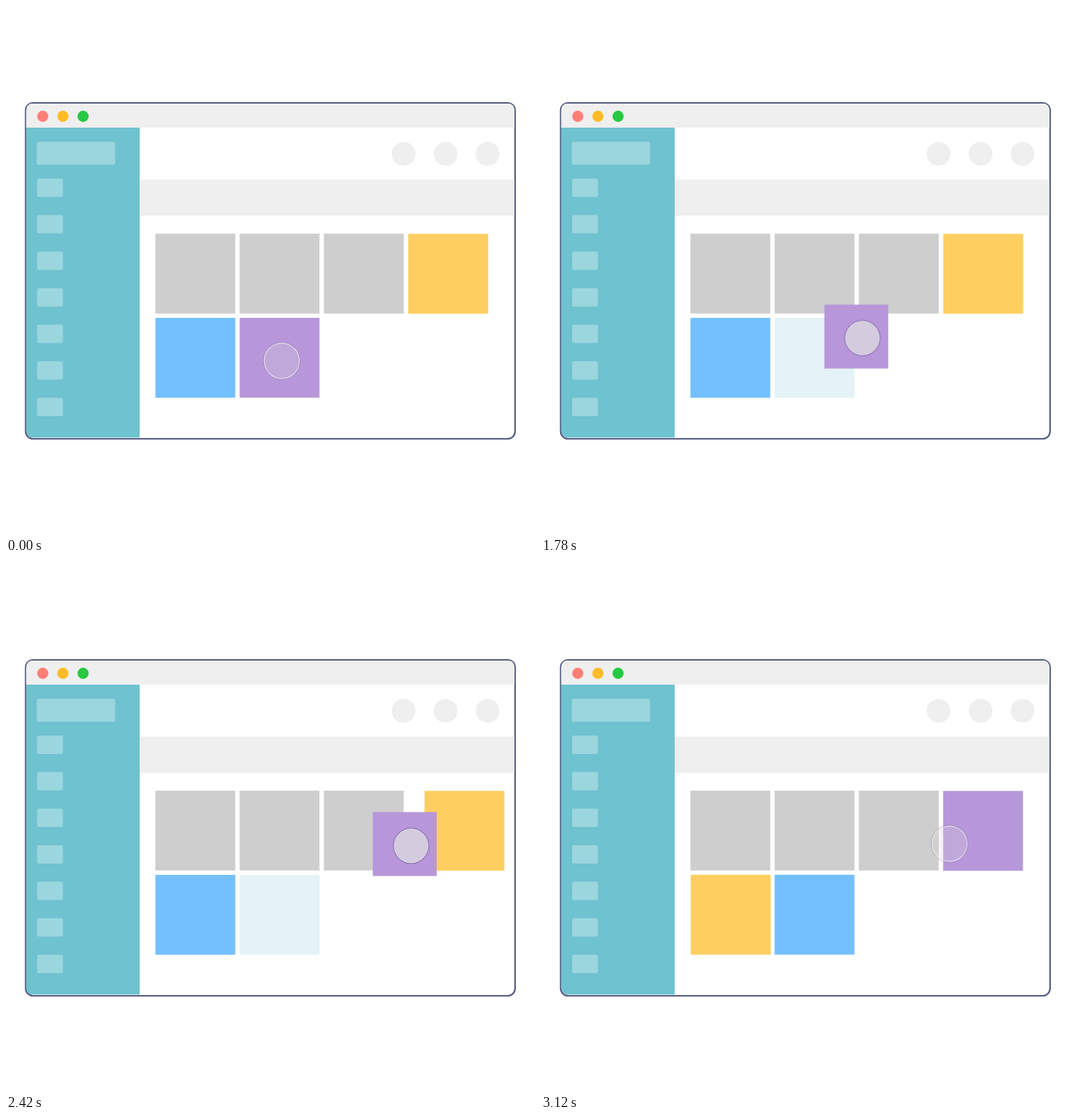
Animation of 748 by 748 pixels, one loop 4.56 s. Source, as an HTML page:

```html
<!DOCTYPE html>
<html lang="en">
<head>
<meta charset="utf-8">
<title>Drag to reorder</title>
<style>
  html, body { margin: 0; width: 100%; height: 100%; overflow: hidden; background: #fff; }
  svg { display: block; width: 100%; height: 100%; }

  .soft { fill: #efefef; }
  .item { fill: #9bd5de; }
  .grey { fill: #cecece; }
  .slot { fill: #e4f3f5; }
  .blue { fill: #74c0ff; }
  .yellow { fill: #ffce60; }
  .purple { fill: #b797da; }

  .slot, .blue, .yellow, .purple, .cursor, .idle, .pressed {
    animation: 4560ms ease infinite;
  }
  .slot { animation-name: slot; animation-timing-function: step-end; }
  .blue { animation-name: blue; }
  .yellow { animation-name: yellow; }
  .purple { animation-name: purple; }
  .cursor { animation-name: cursor; }
  .idle { animation-name: idle; animation-timing-function: step-end; }
  .pressed { animation-name: pressed; animation-timing-function: step-end; }

  @keyframes slot {
    0%, 60.95%, 100% { opacity: 0; }
    31.15% { opacity: 1; }
  }
  @keyframes idle {
    0%, 60.95%, 100% { opacity: 1; }
    28.06% { opacity: 0; }
  }
  @keyframes pressed {
    0%, 60.95%, 100% { opacity: 0; }
    28.06% { opacity: 1; }
  }
  @keyframes blue {
    0%, 60.526% { transform: translate(211.3px, 441px); }
    68.421%, 100% { transform: translate(330.3px, 440.8px); }
  }
  @keyframes yellow {
    0%, 47.368% { transform: translate(568.8px, 322.2px); }
    55.263%, 60.526% { transform: translate(593px, 322.2px); }
    68.421%, 100% { transform: translate(211.8px, 440.8px); }
  }
  @keyframes purple {
    0%, 31.14% { transform: translate(330.4px, 440.9px) scale(1); }
    39.035%, 39.474% { transform: translate(400.7px, 422.3px) scale(.8); }
    47.368%, 47.807% { transform: translate(482px, 375.1px) scale(.8); }
    56.579%, 60.526% { transform: translate(523.3px, 349.3px) scale(.8); }
    68.421%, 100% { transform: translate(568.6px, 322.3px) scale(1); }
  }
  @keyframes cursor {
    0%, 31.14% { transform: translate(390px, 501.7px); }
    39.035%, 39.474% { transform: translate(454.5px, 469.5px); }
    47.368%, 47.807% { transform: translate(535px, 422.5px); }
    56.579%, 100% { transform: translate(577.6px, 397px); }
  }
</style>
</head>
<body>
<svg viewBox="0 0 748 748">
  <defs>
    <clipPath id="frame"><rect x="28.5" y="137.5" width="690.5" height="473" rx="9.5"/></clipPath>
    <rect id="tile" width="112.9" height="112.9"/>
    <rect id="entry" x="44" width="36.5" height="26" rx="2.5"/>
  </defs>

  <!-- window -->
  <rect x="27.8" y="137" width="692" height="475" rx="10.5" fill="#fff" stroke="#545a80" stroke-width="2.2"/>
  <g clip-path="url(#frame)">
    <rect class="soft" x="28" y="138" width="691" height="34"/>
    <rect x="28" y="172" width="161" height="438.5" fill="#6fc2cf"/>
    <rect class="soft" x="189" y="245.5" width="529.5" height="51"/>
  </g>
  <circle cx="52" cy="156" r="7.9" fill="#ff7f77"/>
  <circle cx="80.5" cy="156" r="7.9" fill="#ffbb27"/>
  <circle cx="109" cy="156" r="7.9" fill="#26c941"/>

  <!-- sidebar and toolbar -->
  <g class="item">
    <rect x="43.5" y="192" width="110.8" height="32.5" rx="2.5"/>
    <use href="#entry" y="244"/>
    <use href="#entry" y="295.6"/>
    <use href="#entry" y="347.3"/>
    <use href="#entry" y="399"/>
    <use href="#entry" y="450.6"/>
    <use href="#entry" y="502.3"/>
    <use href="#entry" y="554"/>
  </g>
  <g class="soft">
    <circle cx="562.2" cy="209" r="16.8"/>
    <circle cx="621.6" cy="209" r="16.8"/>
    <circle cx="681" cy="209" r="16.8"/>
  </g>

  <!-- tiles -->
  <g class="grey">
    <use href="#tile" x="211.3" y="321.9"/>
    <use href="#tile" x="330.4" y="321.9"/>
    <use href="#tile" x="449.5" y="321.9"/>
  </g>
  <use class="slot" href="#tile" x="330.4" y="441"/>
  <use class="blue" href="#tile"/>
  <use class="yellow" href="#tile"/>
  <use class="purple" href="#tile"/>

  <g class="cursor">
    <g class="idle">
      <circle r="25.9" fill="none" stroke="#3c3250" stroke-opacity=".45" stroke-width="1"/>
      <circle r="25.1" fill="#d6d4de" fill-opacity=".28" stroke="#fff" stroke-opacity=".8" stroke-width="1.1"/>
    </g>
    <g class="pressed">
      <circle r="24.9" fill="none" stroke="#3c2860" stroke-opacity=".65" stroke-width="1"/>
      <circle r="24.1" fill="#dbd9e0" fill-opacity=".8" stroke="#fff" stroke-opacity=".6" stroke-width="1"/>
    </g>
  </g>
</svg>
</body>
</html>
```
